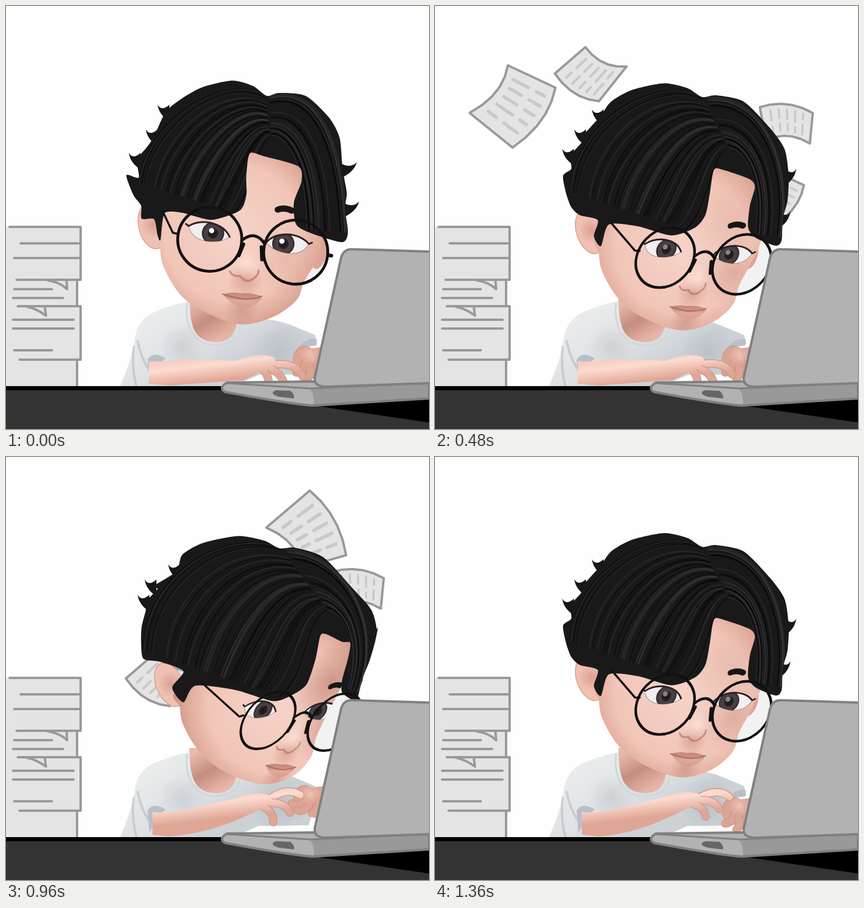
Recreate the animation shown at these times as an HTML page with a canvas. Size 720 px wide and 720 px high, loop 1.44 s.

```html
<!DOCTYPE html>
<html>
<head>
<meta charset="utf-8">
<style>
html, body { margin: 0; height: 100%; overflow: hidden; background: #fefefe }
canvas { display: block }
</style>
</head>
<body>
<canvas id="stage" width="720" height="720"></canvas>
<script>
const c = document.getElementById('stage').getContext('2d');
const STEP = 80, STEPS = 18;
const mix = (a, b, k) => a + (b - a) * k;
const random = n => Math.abs(Math.sin(n * 12.9898) * 43758.5453) % 1;
const parse = s => s.split(' ').map(p => p.split(',').map(Number));
const between = (a, b, k) => a.map((p, i) => p.map((v, j) => mix(v, b[i][j], k)));
const pose = (front, side) => {
  const a = parse(front), b = parse(side);
  return k => between(a, b, k / 2);
};

function ease(t, from, to) {
  const x = Math.min(1, Math.max(0, (t - from) / (to - from)));
  return x * x * (3 - 2 * x);
}

function curve(pts, tension = 6) {
  const path = new Path2D(), n = pts.length, at = i => pts[(i + n) % n];
  path.moveTo(...pts[0]);
  for (let i = 0; i < n; i++) {
    const [p, a, b, q] = [at(i - 1), at(i), at(i + 1), at(i + 2)];
    path.bezierCurveTo(a[0] + (b[0] - p[0]) / tension, a[1] + (b[1] - p[1]) / tension,
      b[0] - (q[0] - a[0]) / tension, b[1] - (q[1] - a[1]) / tension, ...b);
  }
  return path;
}

function oval(x, y, rx, ry = rx, turn = 0) {
  const path = new Path2D();
  path.ellipse(x, y, rx, ry, turn, 0, 7);
  return path;
}

function paint(path, fill, stroke, width = 4) {
  const p = typeof path === 'string' ? new Path2D(path) : path;
  if (fill) { c.fillStyle = fill; c.fill(p); }
  if (stroke) { c.strokeStyle = stroke; c.lineWidth = width; c.stroke(p); }
}

function fade(g, ...stops) {
  stops.forEach(([at, color]) => g.addColorStop(at, color));
  return g;
}

function soft(x, y, r, rgb, alpha) {
  c.fillStyle = fade(c.createRadialGradient(x, y, 0, x, y, r), [0, `rgba(${rgb},${alpha})`], [1, `rgba(${rgb},0)`]);
  c.fillRect(x - r, y - r, 2 * r, 2 * r);
}

// ---- Flying papers: thrown up, hanging at the apex, dropping away ----
const papers = [
  { corners: '124,136 205,174 132,276 59,217', bend: [25, 9], apex: 6, peak: -35, rise: .43, fall: 1.1 },
  { corners: '574,280 628,305 579,373 530,334', bend: [17, 6], apex: 5, peak: -6, rise: 6.6, fall: 6, drift: 9.7 },
  { corners: '256,70 204,115 279,162 326,103', bend: [-8, 20], apex: 8, peak: -12, rise: .75, fall: 1.07 },
  { corners: '553,172 563,228 638,234 643,182', bend: [1, -20], apex: 8.7, peak: -35, rise: .66, fall: .5 },
  { corners: '517,52 443,115 505,183 579,162', bend: [20, -13], apex: 10, peak: -14, rise: .87, fall: 1.2 }
].map(p => ({ ...p, corners: parse(p.corners) }));

function drawPaper({ corners: [a, b, d, e], bend, apex, peak, rise, fall, drift = 0 }, t) {
  const surface = (u, v) => bend.map((w, i) =>
    mix(mix(a[i], b[i], u), mix(e[i], d[i], u), v) + w * 2 * v * (1 - v));
  const side = u => [0, .2, .4, .6, .8, 1].map(v => surface(u, v));
  c.save();
  c.translate((t - 6) * drift, peak + (t < apex ? rise : fall) * (t - apex) ** 4);
  paint(`M${[...side(0), ...side(1).reverse()].join('L')}Z`, '#e4e4e4', '#999');
  const size = Math.hypot(b[0] - a[0], b[1] - a[1]);
  for (let row = 0; row < 5; row++) {
    const v = .18 + row * .16, gap = .3 + .35 * random(row + 3);
    paint(`M${surface(.17, v)}L${surface(gap, v)}M${surface(gap + .17, v)}L${surface(.84, v)}`,
      null, '#c9c9c9', size / 16);
  }
  c.restore();
}

// ---- Furniture ----
function drawStack() {
  paint('M0 376H127V466H121V511H127V602H121V647H0Z', '#e4e4e4');
  paint('M6 376H127V466H18M25 404H127M14 429H127M121 466V511M14 482H78M12 497H97' +
    'M71 467Q92 470 104 482L103 466M20 511H127V602H23M36 512Q52 515 68 527L66 512' +
    'M12 534H115M12 549H115M14 586H78M121 602V647', null, '#999');
}

function drawDesk() {
  c.fillStyle = '#333';
  c.fillRect(0, 647, 720, 73);
  c.fillStyle = '#000';
  c.fillRect(0, 647, 720, 7);
  paint('M530 681L720 664V709Z', '#000');
  const base = 'M376 641L526 639L720 642V668L524 680Q500 680 373 657Q361 650 376 641Z';
  paint(base, '#b2b2b2');
  paint('M518 652L720 642V668L524 680Q526 664 518 652Z', '#999');
  paint('M376 642L518 651L720 642', null, '#808080', 3);
  paint(base, null, '#808080');
  paint('M460 654L484 655Q492 661 490 668L464 665Q446 659 460 654Z', '#666');
  paint('M570 430Q574 413 590 414L722 418V642L545 648Q522 648 526 630Z', '#b2b2b2', '#808080');
}

// ---- Body ----
const shirt = 'M193 650C206 618 215 596 218 574C222 540 236 526 262 517Q290 506 312 503L400 538' +
  'Q440 526 485 543L526 560L530 575L510 582Q526 600 515 627L430 628L380 650Z';

function drawBody() {
  paint(shirt, fade(c.createLinearGradient(240, 510, 330, 650), [0, '#eceeee'], [.6, '#dfe2e4'], [1, '#ccd1d6']));
  soft(300, 580, 40, '150,158,168', .25);
  soft(465, 590, 50, '150,158,168', .3);
  paint('M217 580Q214 620 222 646M224 570Q230 600 243 618', null, 'rgba(150,158,168,.35)');
  paint('M308 506C304 545 320 575 352 577C384 578 398 564 399 540', null, '#d3d7da', 3);
  paint('M312 495C313 540 318 562 342 570C378 578 392 560 393 535V500Z',
    fade(c.createLinearGradient(312, 510, 350, 575), [0, '#e9b9ab'], [.5, '#c58d7f'], [1, '#e6b5a7']));
  paint('M494 586Q510 563 529 567L528 578L505 580Z', '#b9bec8');
}

function finger(x, y, angle, length, skin) {
  const point = (r, a) => [x + r * Math.cos(a), y + r * Math.sin(a)];
  const path = `M${x} ${y}Q${point(length * .75, angle - .5)} ${point(length, angle)}`;
  paint(path, null, '#cf9686', 14);
  paint(path, null, skin, 11.5);
}

function drawArms(t) {
  const far = ease(t, 8, 12) - ease(t, 14, 17), near = ease(t, 8, 13);
  const fy = mix(602, 582, far), y = mix(612, 588, near), x = mix(432, 426, near);
  const farSkin = '#dba494', edge = '#d09888';
  paint(`M505 ${fy - 18}L545 ${fy - 22}V${fy + 36}L515 ${fy + 30}Z`, farSkin);
  paint(oval(508, fy, 19, 23), farSkin, edge, 1.5);
  finger(510, fy + 4, 2.3 + far * .7, 24, farSkin);
  finger(516, fy + 10, 1.7 + far, 22, farSkin);
  soft(518, fy - 8, 18, '250,214,202', .6);

  paint('M241 602Q250 586 272 600L262 608L244 640Z', '#b9bfca');
  const skin = fade(c.createLinearGradient(300, y - 18, 306, y + 32), [0, '#f1c6b9'], [.45, '#fddbcf'], [1, '#dfa696']);
  for (let i = 0; i < 3; i++)
    finger(x + 12 - i * 6, y, mix(.3, -.2, near) + i * .45 + .1 * Math.sin(t * 2 + i), 64 - 11 * i, skin);
  const left = 243 + near * 7;
  paint(`M${left} 604Q262 607 300 601L${x - 40} ${y - 8}Q${x} ${y - 24} ${x + 24} ${y - 14}Q${x + 34} ${y} ${x} ${y + 12}` +
    `L${x - 28} ${y + 25}Q340 641 280 646L${left} 643Z`, skin);
}

// ---- Head: silhouettes are posed facing front and turned aside ----
const face = pose(
  '262,370 262,412 270,448 300,495 345,524 400,542 455,529 495,500 507,470 530,430 540,390 520,280 420,245 330,290',
  '295,400 296,432 302,462 328,505 370,540 435,562 485,550 518,518 528,482 543,450 575,385 590,320 530,300 440,350');
const hair = pose(
  '230,340 217,322 205,288 226,292 223,262 240,240 252,222 272,180 300,157 335,138 385,127 420,136 444,153 465,148 510,153 550,190 568,225 573,278 580,318 577,345 582,385 572,402 520,387 494,372 490,335 503,298 498,273 440,256 415,251 409,290 409,322 398,348 350,364 300,352 270,353 263,398 258,390 252,363 231,362',
  '234,345 230,318 231,290 238,262 238,248 258,226 250,222 290,196 300,168 335,148 395,136 440,144 465,157 492,156 540,172 590,225 622,262 631,300 620,345 607,378 598,412 588,414 572,402 572,382 582,345 586,318 572,316 545,303 535,306 527,345 512,388 488,406 455,417 390,398 322,391 302,419 283,394 302,366 262,350');
const temple = pose('267,350 284,386 293,388', '334,390 397,447 404,445');
// start, two bends and end of the outermost, then the innermost strand
const strands = [
  pose('442,154 370,110 240,190 226,300 448,225 425,235 420,320 392,352',
    '466,156 370,120 235,200 234,330 548,265 505,280 520,370 470,410'),
  pose('450,152 530,130 575,220 582,385 452,222 480,225 510,280 510,380',
    '475,156 570,160 650,280 600,400 552,265 575,275 600,310 580,395')];

function drawHair(k) {
  const pts = hair(k), shape = curve(pts, 8);
  for (const i of [4, 6, 7, 17, 19]) {
    const [x, y] = pts[i], side = i < 10 ? -1 : 1, len = side < 0 ? 14 : 24 - 11 * k;
    paint(`M${x - side * 6} ${y - 12}Q${x + side * len / 2} ${y} ${x + side * len} ${y - 12}Q${x + side * len * .8} ${y + 6} ${x - side * 6} ${y + 16}Z`, '#171718');
  }
  paint(shape, '#19191a');
  c.save();
  c.clip(shape);
  for (const [n, set] of strands.entries()) {
    const s = set(k);
    for (let i = 0; i < 46; i++) {
      const q = random(i + n * 60), shift = 14 * (random(i + 200) - .5);
      const [a, b, d, e] = between(s.slice(0, 4), s.slice(4), q);
      paint(`M${a}C${b[0] + shift} ${b[1]} ${d[0]} ${d[1] + shift} ${e}`, null,
        i % 2 ? 'rgba(62,62,66,.4)' : 'rgba(4,4,5,.55)', .8 + 1.6 * random(i + 90));
    }
  }
  c.restore();
}

// Features share one slanted frame centred on the bridge of the glasses
function enterFrame(k) {
  c.save();
  c.translate(420 + 32.5 * k + 4.5 * k * k, 408 + 28.5 * k - 2.5 * k * k);
  c.rotate(.148 - .061 * k);
  c.transform(1 - .115 * k, 0, -.17 * k, 1 - .05 * k, 0, 0);
}

function drawEye(side, k) {
  c.save();
  c.translate(side < 0 ? -77 : 58, -12);
  c.scale(side, 1);
  const shape = new Path2D('M36 -5Q22 -17 0 -16Q-25 -14 -36 3Q-24 15 0 16Q28 16 36 -5Z');
  paint(shape, '#f1efef');
  c.save();
  c.clip(shape);
  paint(oval(-7, 1, 19), fade(c.createRadialGradient(-7, 1, 0, -7, 1, 19),
    [0, '#1a1718'], [.42, '#262122'], [.52, '#4b4345'], [.85, '#433b3d'], [1, '#211c1d']));
  paint(oval(-7 - side * 3, -3, 4.5), `rgba(255,255,255,${Math.max(0, 1 - k * .55)})`);
  c.restore();
  paint('M-36 3Q-25 -14 0 -16Q22 -17 36 -5L41 -8', null, '#2a2021', 3);
  paint('M-36 3Q-24 15 0 16Q28 16 36 -5', null, 'rgba(90,60,55,.5)', 1);
  c.restore();
}

function drawMouth(k, pout) {
  c.save();
  c.translate(-5, 88);
  c.rotate(.06 * k - .12);
  c.scale(1 + .25 * pout, 1);
  soft(0, 22, 30, '180,115,100', .4);
  paint('M-33 -3Q-18 -8 -3 -5Q12 -8 33 -1Q30 14 8 19Q-12 21 -33 -3Z',
    fade(c.createLinearGradient(0, -8, 0, 20), [0, '#c18679'], [.35, '#cd9284'], [.55, '#e0a99b'], [1, '#d59c8d']));
  const sag = 3 - 7 * pout;
  paint(`M-33 -3Q-14 ${sag} 0 4Q18 ${sag + 2} 33 -1`, null, '#aa6e62', 2.2);
  c.restore();
}

function drawFeatures(k, pout) {
  soft(-4, 60, 30, '185,112,98', .4);
  soft(-4, 32, 26, '255,228,218', .7);
  soft(62, 15, 62, '175,105,92', .14 + .14 * k);
  soft(30, -75, 80, '170,105,92', .13 * k * k);
  paint('M-32 49Q-26 58 -14 54Q0 68 12 52Q17 48 16 40', null, 'rgba(176,110,96,.6)', 3.5);
  drawMouth(k, pout);
  c.save();
  c.translate(-6 * k * k, -4 * k);
  for (const side of [-1, 1]) drawEye(side, k);
  c.restore();
  paint('M33 -67Q44 -73 57 -69', null, '#171516', 10.5);
}

function drawHead(t) {
  const k = 2 * (ease(t, 4, 8) - ease(t, 13.5, 20.5)) - .12 * Math.sin(Math.PI * Math.min(t, 6) / 6);
  const pout = ease(t, 0, 3) - ease(t, 3, 7), bob = -7 * ease(t, 8, 14);
  const lenses = [-74, 74].map(x => oval(x, 0, 54.5));
  c.save();
  c.translate(0, bob);
  enterFrame(k);
  paint(lenses[1], '#f2f2f2');
  c.restore();
  paint(oval(532 + 4 * k, 420, 14, 28, .2), '#dda596');
  const ex = 249 + 15 * k, ey = 375 + 9 * k;
  paint(oval(ex, ey, 23, 39, -.25 - .08 * k), '#f0c1b3', '#d9a091', 1.5);
  soft(ex + 2, ey - 2, 22, '190,120,105', .45);

  const skin = curve(face(k)), fx = 385 + 38 * k, fy = 385 + 22 * k;
  paint(skin, fade(c.createRadialGradient(fx, fy, 20, fx, fy, 180),
    [0, '#f6d1c5'], [.6, '#f1c6b8'], [.82, '#e0ab9b'], [1, '#c78d7f']));
  c.save();
  c.clip(skin);
  enterFrame(k);
  drawFeatures(k, pout);
  c.restore();
  c.restore();
  c.restore();

  c.save();
  c.translate(0, bob * .3);
  drawHair(k);
  c.restore();

  c.save();
  c.translate(0, bob);
  paint(`M${temple(k).join('L')}`, null, '#111', 3.5);
  enterFrame(k);
  for (const lens of lenses) paint(lens, null, '#111', 4.8);
  paint('M-20 -6Q0 -28 20 -6', null, '#111', 5);
  paint('M-16 0L-21 20M15 0L19 21M129 -3h6', null, '#111', 6);
  c.restore();
  c.restore();
}

function draw(t) {
  c.lineCap = c.lineJoin = 'round';
  c.fillStyle = '#fefefe';
  c.fillRect(0, 0, 720, 720);
  for (const paper of papers) drawPaper(paper, t);
  drawStack();
  drawBody();
  drawHead(t);
  drawArms(t);
  drawDesk();
}

function tick() {
  draw(Math.floor(performance.now() / STEP) % STEPS);
  requestAnimationFrame(tick);
}
tick();
</script>
</body>
</html>
```
